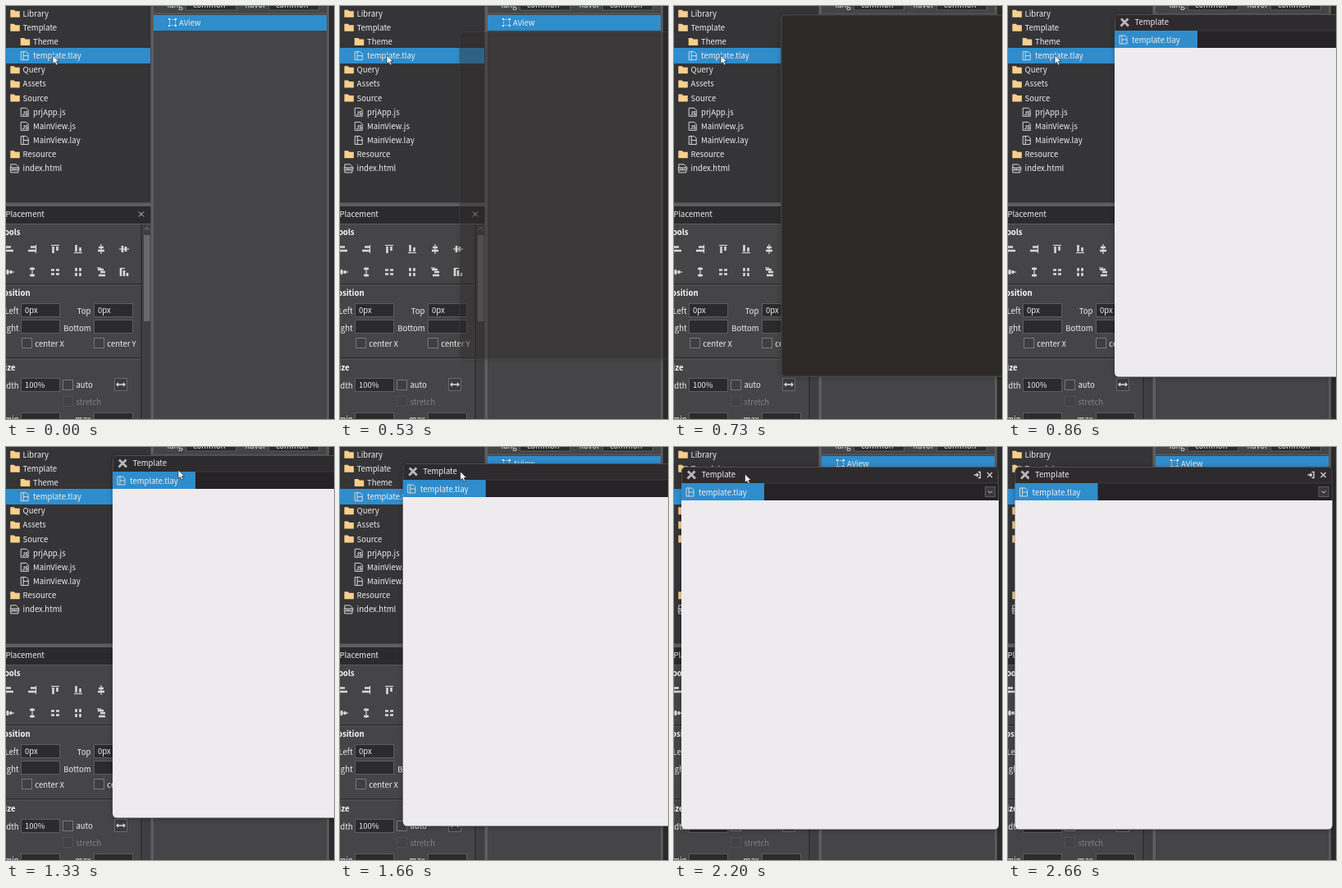
An HTML page for the animation above (3400 ms loop, 400 by 503 pixels).

```html
<!DOCTYPE html>
<html lang="en">
<head>
<meta charset="utf-8">
<title>Layout editor</title>
<style>
  html, body { margin: 0; width: 100%; height: 100%; overflow: hidden; background: #454446; }
  svg { display: block; width: 400px; height: 503px; }
  text { font: 9.5px "Noto Sans CJK KR", "Noto Sans CJK JP", "Noto Sans CJK SC", "Noto Sans CJK", "Noto Sans", sans-serif; fill: #f0f0f0; white-space: pre; }
  .head { font-weight: 700; fill: #fff; }
  .line { fill: none; stroke: #d8d8d8; }
  #win { filter: drop-shadow(0 1px 3px rgba(0, 0, 0, .25)); }
</style>
</head>
<body>
<svg id="stage" viewBox="0 0 400 503"></svg>
<script>
const BLUE = '#2f8dcc', DARK = '#2b2a2c', PANEL = '#454446';

const rect = (x, y, w, h, fill, more = '') =>
  `<rect x="${x}" y="${y}" width="${w}" height="${h}" fill="${fill}" ${more}/>`;
// y is the middle of the capitals
const text = (x, y, s, more = '') => `<text x="${x}" y="${y + 3.5}" ${more}>${s}</text>`;
const label = (x, y, s) => text(x, y, s, 'text-anchor="end"');
const head = (x, y, s) => text(x, y, s, 'class="head" text-anchor="end"');
const line = (d, more = '') => `<path class="line" d="${d}" ${more}/>`;
const at = (x, y, s) => `<g transform="translate(${x} ${y})">${s}</g>`;
const field = (x, y, s = '') =>
  rect(x + .5, y + .5, 47, 16, DARK, 'stroke="#5c5b5e"') + text(x + 5, y + 8.5, s);
const check = (x, y, more = '') => rect(x + .5, y + .5, 12, 12, '#3f3e40', `stroke="#77767a" ${more}`);

const folder = '<path d="M0-4.5H4.5L6-3H11.5V4.5H0Z" fill="#f8cf8d"/>';
const page = line('M.5-5H7L9.5-2.5V5H.5Z');
const icons = {
  folder,
  js: page + '<text x="2" y="3.4" style="font-size:6px;font-weight:700">JS</text>',
  lay: page + line('M3.5-5V5M3.5 0H9.5'),
  html: page + rect(-.5, -1.5, 11.5, 4, '#d8d8d8') +
    '<text x="0" y="2" style="font-size:4px;font-weight:700;fill:#333">HTML</text>',
};

function tree() {
  const rows = [
    ['folder', 0, 'Library'], ['folder', 0, 'Template'], ['folder', 1, 'Theme'],
    ['lay', 1, 'template.tlay'], ['folder', 0, 'Query'], ['folder', 0, 'Assets'],
    ['folder', 0, 'Source'], ['js', 1, 'prjApp.js'], ['js', 1, 'MainView.js'],
    ['lay', 1, 'MainView.lay'], ['folder', 0, 'Resource'], ['html', 0, 'index.html'],
  ];
  return rect(0, 0, 177, 240, '#353437') + rect(0, 51, 176, 19, BLUE) +
    rows.map(([icon, depth, name], i) => {
      const x = 5.3 + depth * 12.4, y = 9.2 + i * 17.15;
      return at(x, y, icons[icon]) + text(x + 15.3, y, name);
    }).join('');
}

// each tool: thick bars, thin guide
const tools = [
  ['M-4-2.5H2M-4 2H5', 'M-4.5-5V5'], ['M-2-2.5H4M-5 2H4', 'M4.5-5V5'],
  ['M-2.5-3V5M2.5-3V2', 'M-5-4.5H5'], ['M-2.5-5V3M2.5-2V3', 'M-5 4.5H5'],
  ['M-3-2H3M-4 2H4', 'M0-6V6'], ['M-2-4V4M2-3V3', 'M-6 0H6'],
  ['M-2-3V3M2-2V2', 'M-6 0H6'], ['M-3-4H3M-3 4H3', 'M0-6V6'],
  ['M-5-2.5H-1M1-2.5H5M-5 2.5H-1M1 2.5H5', ''], ['M-2.5-5V-1M-2.5 1V5M2.5-5V-1M2.5 1V5', ''],
  ['M-4-3H3M-1 0H5M-3 4H5', 'M-5-5H0'], ['M-4-5V5M0-2V5M4 1V5', 'M-5-4.5H1'],
];

function placement() {
  return rect(0, 239.5, 177, 4.5, '#5e5d60') + rect(0, 244, 177, 259, PANEL) +
    rect(0, 244, 177, 21, DARK) + text(-.6, 253, 'Placement') + line('M162 250.5L168 256.5M168 250.5L162 256.5') +
    rect(0, 265, 177, 1, '#59585b') +
    [338, 428].map(y => rect(0, y, 165, 1.5, DARK) + rect(0, y + 1.5, 165, 1, '#59585b')).join('') +
    rect(164.5, 266, 1.5, 237, DARK) +
    rect(167, 266, 10, 237, '#3f3e40') + rect(168, 279, 7.5, 105, '#69686b') +
    line('M169 272.5L171.7 269.5L174.4 272.5', 'stroke-opacity=".5"') +
    head(17.5, 275, 'Tools') +
    tools.map(([bars, guide], i) =>
      at(4 + i % 6 * 28, i < 6 ? 296 : 324, line(bars, 'stroke-width="2.6"') + line(guide, 'stroke-width="1.2"'))).join('') +
    head(29.5, 349.5, 'Position') +
    label(15.5, 371, 'Left') + field(18, 362, '0px') + label(103.5, 371, 'Top') + field(107, 362, '0px') +
    label(15.5, 392, 'Right') + field(18, 382) + label(103.5, 392, 'Bottom') + field(107, 382) +
    check(19, 404) + text(35.3, 411, 'center X') + check(107, 404) + text(123.3, 411, 'center Y') +
    head(11.5, 440.5, 'Size') +
    label(15.5, 462.5, 'Width') + field(18, 453, '100%') + check(69, 455) + text(85.5, 461.5, 'auto') +
    rect(132.5, 453.5, 15, 15, '#3c3b3d', 'stroke="#69686b"') +
    line('M135 461H145M137 459L135 461L137 463M143 459L145 461L143 463', 'stroke-width="1.3"') +
    check(69, 475, 'opacity=".2"') + text(85.5, 482, 'stretch', 'opacity=".35"') +
    label(15.5, 503, 'min') + field(18, 495) + label(103.5, 503, 'max') + field(107, 495);
}

function outline() {
  const combo = (x, name) => rect(x + .5, -12, 61, 17, DARK, 'stroke="#5c5b5e"') + text(x + 9, -1.5, name);
  return rect(176.5, 0, 3.5, 503, '#5e5d60') + rect(180, 0, 211, 503, PANEL) +
    text(196.5, -1.5, 'lang') + combo(219, 'common') + text(291.5, -1.5, 'flavor') + combo(320, 'common') +
    rect(180, 8.5, 211, 1.5, '#59585b') + rect(180, 11, 211, 19, BLUE) +
    line('M199.5 16.5H206.5V23.5H199.5Z', 'stroke-dasharray="1.5 1"') +
    [[198, 15], [206, 15], [198, 23], [206, 23]].map(([x, y]) => rect(x, y, 2, 2, '#e8e8e8')).join('') +
    text(211, 20, 'AView') +
    rect(391, 0, 3, 503, '#59585b') + rect(394, 0, 6, 503, '#2b2a2c');
}

function dialog() {
  return rect(.5, .5, 386, 441, '#2d2926', 'rx="5" stroke="#514e4e"') +
    '<g id="content">' +
    rect(1, 1, 385, 19, '#2d2b2d', 'rx="4"') + rect(1, 20, 385, 21, '#252326') +
    rect(101, 19.5, 285, 1, '#3e3c3f') + rect(0, 20, 101, 21, BLUE) +
    '<path d="M0 41H387V436Q387 441.5 381.5 441.5H5.5Q0 441.5 0 436Z" fill="#edebee"/>' +
    line('M8 5.5L17 14.5M16.5 5.5L7.5 14.5', 'stroke-width="2.8" style="stroke:#b9b8ba"') +
    text(24.5, 9.5, 'Template') + at(5.5, 31, icons.lay) + text(21, 31, 'template.tlay') +
    line('M362 6.5H364.5V13.5H362M357 10H362M360 8L362 10L360 12', 'stroke-width="1.3"') +
    line('M373 7L379 13M379 7L373 13', 'stroke-width="1.2"') +
    rect(370.5, 24.5, 12, 12, '#3a383b', 'stroke="#5c5b5e"') + line('M374 29.5L376.5 32L379 29.5') +
    '</g>';
}

const stage = document.getElementById('stage');
stage.innerHTML = tree() + placement() + outline() +
  `<g id="win">${dialog()}</g>` +
  '<path id="cursor" d="M0 0V10.5L2.5 8.3L4.2 12L6 11.2L4.4 7.6H7.7Z" fill="#fff" stroke="#222" stroke-width=".7"/>';
const [win, content, cursor] = ['win', 'content', 'cursor'].map(id => document.getElementById(id));

// rows of [time, value, value]
const opening = [[400, .86, .06], [466, .88, .2], [533, .904, .42], [600, .95, .7], [666, .98, .92], [733, .998, 1], [800, 1, 1]];
const dragging = [[1400, 130, 10], [1466, 127, 11], [1533, 117, 13], [1600, 100, 17], [1666, 77, 20],
  [1800, 25, 24], [1866, 15, 24.5], [2000, 10.5, 24], [2266, 8.5, 24]];
const pointing = [[866, 57, 60], [933, 63, 58], [1000, 92, 51], [1133, 185, 32], [1233, 223, 24], [1333, 210, 28],
  [1400, 208, 22], [1466, 204, 23], [1533, 190, 25], [1600, 170, 28], [1666, 147, 30], [1800, 103, 33],
  [1866, 93, 33.5], [2000, 88, 33], [2266, 86, 33], [2466, 86, 33], [2533, 100, 40], [2600, 123, 49]];

function sample(keys, t) {
  const i = keys.findIndex(k => k[0] > t);
  if (i === 0) return keys[0].slice(1);
  if (i < 0) return keys[keys.length - 1].slice(1);
  const a = keys[i - 1], b = keys[i], p = (t - a[0]) / (b[0] - a[0]);
  return [1, 2].map(n => a[n] + (b[n] - a[n]) * p);
}

const STEP = 200 / 3; // the picture advances 15 times a second
const start = performance.now();

function draw() {
  const time = (performance.now() - start) % 3400;
  const t = Math.floor((time + 6.8) / STEP) * STEP;
  const [scale, alpha] = sample(opening, t);
  const [x, y] = sample(dragging, t);
  const [cx, cy] = sample(pointing, t);
  win.style.display = t < 399 ? 'none' : '';
  win.style.opacity = alpha;
  win.setAttribute('transform', `translate(${x} ${y}) translate(158 219) scale(${scale}) translate(-158 -219)`);
  content.style.display = t < 799 ? 'none' : '';
  cursor.style.display = t > 2660 ? 'none' : '';
  cursor.setAttribute('transform', `translate(${cx} ${cy})`);
  requestAnimationFrame(draw);
}
draw();
</script>
</body>
</html>
```
